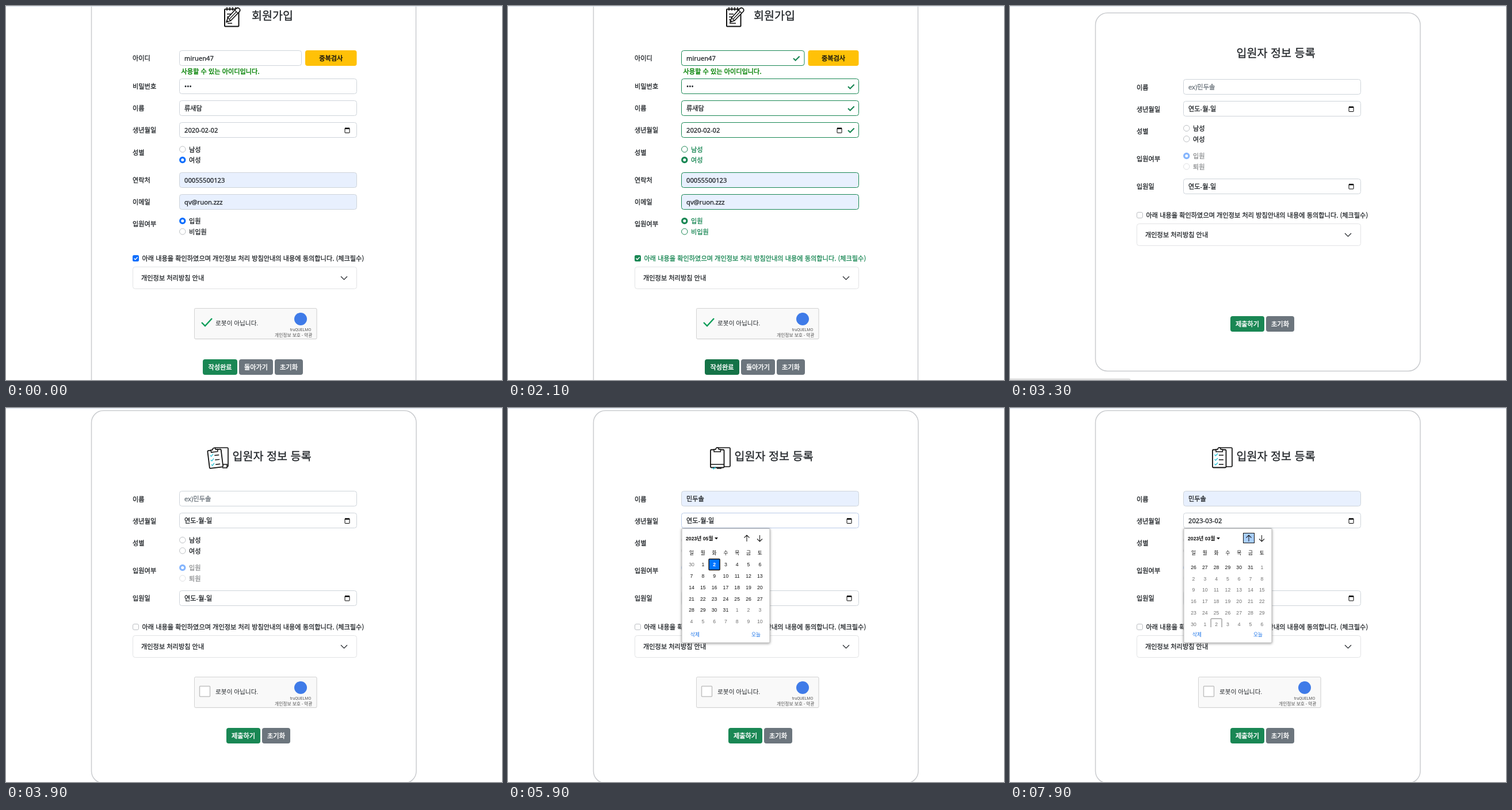
Recreate the animation shown at these times as an HTML page. Size 862x650 px, loop 8 s.

```html
<!DOCTYPE html>
<html lang="ko">
<head>
<meta charset="utf-8">
<title>회원가입</title>
<style>
html, body { margin: 0; height: 100%; overflow: hidden; background: #fff; }
svg { display: block; width: 100vw; height: 100vh; }
text { font-family: "Noto Sans CJK KR", "Noto Sans CJK", sans-serif; }
text.value { font-family: "Noto Sans", "Noto Sans CJK KR", sans-serif; }
text.cal { font-family: "Liberation Sans", "Noto Sans CJK KR", sans-serif; }
text.bot { font-family: Roboto, "Noto Sans CJK KR", sans-serif; }
</style>
</head>
<body>
<svg id="stage" viewBox="0 0 862 650">
<defs>
  <filter id="shadow" x="-10%" y="-10%" width="120%" height="125%">
    <feDropShadow dx="0" dy="1" stdDeviation="2" flood-opacity=".4"/>
  </filter>
  <filter id="soft" x="-10%" y="-10%" width="120%" height="125%">
    <feDropShadow dx="0" dy="1" stdDeviation="1" flood-opacity=".15"/>
  </filter>
  <clipPath id="days"><rect x="303" y="261" width="151" height="120"/></clipPath>
  <clipPath id="board"><rect x="351" y="76" width="25" height="31"/></clipPath>
</defs>
<g id="scene"></g>
</svg>
<script>
const LOOP = 8000;
const INK = '#212529', BLUE = '#0d6efd', GREEN = '#198754', GRAY = '#6c757d', LINE = '#ced4da', FILLED = '#e8f0fe';
const NAME = '민두솔', EMPTY_DATE = '연도-월-일';

const ramp = (t, a, b) => Math.min(1, Math.max(0, (t - a) / (b - a)));
const ease = k => k < .5 ? 2 * k * k : 1 - 2 * (1 - k) ** 2;
const mix = (a, b, k) => `rgb(${a.map((v, i) => v + (b[i] - v) * k)})`;

const rect = (x, y, w, h, fill, stroke = 'none', rx = 0, more = '') =>
  `<rect x="${x}" y="${y}" width="${w}" height="${h}" rx="${rx}" fill="${fill}" stroke="${stroke}" ${more}/>`;
const path = (d, stroke, w = 1, fill = 'none', more = '') =>
  `<path d="${d}" stroke="${stroke}" stroke-width="${w}" fill="${fill}" ${more}/>`;
const circle = (x, y, r, fill, stroke = 'none') =>
  `<circle cx="${x}" cy="${y}" r="${r}" fill="${fill}" stroke="${stroke}"/>`;
const group = (body, attrs) => `<g ${attrs}>${body}</g>`;

// Text centred vertically on y; heavy adds a thin outline for a medium weight.
function text(x, y, s, { size = 11.2, fill = INK, heavy = .28, anchor = 'start', cls = '', weight = 400 } = {}) {
  return `<text x="${x}" y="${y + size * .37}" class="${cls}" font-size="${size}" font-weight="${weight}" fill="${fill}" ` +
    `stroke="${fill}" stroke-width="${heavy}" text-anchor="${anchor}">${s}</text>`;
}

const field = (y, value, { stroke = LINE, fill = '#fff', color = INK, w = 308 } = {}) =>
  rect(301.5, y + .5, w, 26, fill, stroke, 4) + text(310, y + 14, value, { fill: color, cls: 'value' });

const button = (x, y, w, label, fill, color = '#fff') =>
  rect(x, y, w, 27, fill, 'none', 4) +
  text(x + w / 2, y + 14, label, { fill: color, anchor: 'middle', heavy: .45 });

const tick = (x, y) => path(`M${x - 5} ${y}l3.6 3.6l7 -7.2`, GREEN, 2.1);

const dateIcon = (x, y) =>
  rect(x - 4, y - 3.5, 8, 8, 'none', '#000', .5) + rect(x - 4, y - 4.5, 8, 2.5, '#000');

function radio(y, label, on, { accent = BLUE, ring = '#bcbfc3', color = INK } = {}) {
  const dot = on ? circle(306.8, y, 5.7, accent) + circle(306.8, y, 2.5, '#fff') : circle(306.8, y, 5.2, '#fff', ring);
  return dot + text(318, y + .5, label, { fill: color });
}

function consent(y, on, accent, color) {
  const box = on
    ? rect(220, y, 11, 11, accent, 'none', 2.5) + path(`M222.5 ${y + 5.6}l2.2 2.2l4 -4.2`, '#fff', 1.4)
    : rect(220.5, y + .5, 10, 10, '#fff', '#bcbfc3', 2.5);
  return box +
    text(236.5, y + 6, '아래 내용을 확인하였으며 개인정보 처리 방침안내의 내용에 동의합니다. (체크필수)', { fill: color }) +
    rect(220.5, y + 20.5, 389, 38, '#fff', '#e2e3e5', 4) +
    text(235, y + 39.5, '개인정보 처리방침 안내') +
    path(`M582 ${y + 37}l5.5 5.5l5.5 -5.5`, INK, 1.2);
}

function robotCheck(y, done) {
  const mark = done
    ? path(`M340 ${y + 25}l6 6l12 -13`, '#0a9d58', 2.4)
    : rect(336.5, y + 16.5, 18, 18, '#fff', '#c1c1c1', 1, 'stroke-width="1.5"');
  return rect(327.5, y + .5, 213, 54, '#000', 'none', 2, 'opacity=".08"') +
    rect(327.5, y + .5, 212.5, 53, '#f9f9f9', '#d3d3d3', 2) + mark +
    text(364, y + 26.5, '로봇이 아닙니다.', { size: 10.7, cls: 'bot', heavy: 0 }) +
    circle(512, y + 19, 11, '#3f7be8') +
    text(512, y + 37.5, 'truQUELMO', { size: 7, cls: 'bot', heavy: 0, fill: '#555', anchor: 'middle' }) +
    text(467, y + 47.5, '개인정보 보호 - 약관', { size: 7.8, cls: 'bot', heavy: 0, fill: '#555' });
}

function notepad(t) {
  const clock = t < 1200 ? Math.min(t, 400) : Math.min(t, 2700) - 800;
  const dx = 4 - 4 * Math.cos(clock / 1075 * 2 * Math.PI);
  return rect(380, 5.5, 24.5, 30, '#fff', '#111', 1, 'stroke-width="2"') +
    path('M384 2v6M389 2v6M394 2v6M399 2v6', '#111', 1.6) +
    path('M384 14h8M384 19h7M384 24h6', '#111', 1.5) +
    path(`M385 30h${8 + dx}`, '#111', 1.5) +
    group(
      path('M383 28L385.5 20.5L400 4.5Q403 2 405.5 4.5Q408 7 405.5 10L390.5 25.5Z', '#111', 1.7, '#fff', 'stroke-linejoin="round"') +
      path('M397.5 7l5.5 5.5M385.5 20.5l5 5M388.5 22.5l12 -12.5', '#111', 1.1) +
      path('M383 28l1 -3l2 2Z', '#111', 1, '#111'),
      `transform="translate(${dx} 0)"`);
}

function clipboard(t) {
  const tilt = 1 - ramp(t, 4200, 4450);
  const rise = t < 5900 ? 0 : 23 - 23 * ramp(t, 6500, 7400);
  const checks = t < 4450 || t > 5200;
  let rows = '';
  for (let i = 0; i < 3; i++) {
    const y = 82 + 8 * i + rise;
    if (checks) {
      rows += path(`M355.5 ${y - 1}l2 2l3.5 -4`, '#2bc4d8', 1.3) + path(`M363 ${y}h8`, '#111', 1.5);
    } else {
      const half = 7 * ramp(t, 4500 + 150 * i, 5100 + 150 * i);
      rows += path(`M${364 - half} ${y + 2}h${2 * half}`, '#111', 1.5);
    }
  }
  if (rise > 0) rows += path(`M351 ${75 + rise}h25`, '#111', 1.5);
  const curl = tilt > 0 ? path('M376 98h8v6h-8', '#111', 1.5, '#fff', `opacity="${tilt}"`) : '';
  return rect(362, 69, 24, 33, '#fff', '#111', 1.5, 'stroke-width="1.7"') + curl +
    group(
      rect(352, 72.5, 23.5, 31, '#fff', '#111', 1.5, 'stroke-width="1.8"') +
      group(rows, 'clip-path="url(#board)"') +
      path('M358 76v-4h3q0 -3 2.7 -3q2.7 0 2.7 3h3v4Z', '#111', 1.5, '#fff'),
      `transform="rotate(${-7 * tilt} 366 88)"`);
}

function signUp(t) {
  const valid = t >= 1200, k = ramp(t, 1150, 1300);
  const stroke = mix([206, 212, 218], [25, 135, 84], k);
  const style = valid ? { accent: GREEN, ring: GREEN, color: GREEN } : {};
  const hover = mix([25, 135, 84], [21, 115, 71], ramp(t, 650, 800));
  const shift = valid ? 1.5 : 0;
  const labels = [['아이디', 91], ['비밀번호', 140], ['이름', 178], ['생년월일', 216], ['성별', 254.5],
    ['연락처', 302.5], ['이메일', 341], ['입원여부', 379]];
  return path('M148.5 0V650M712.5 0V650', '#cacccf', 1.5) +
    notepad(t) + text(427, 17, '회원가입', { size: 19.6 }) +
    labels.map(([s, y]) => text(220, y, s)).join('') +
    field(77, 'miruen47', { stroke, w: 212 + shift }) +
    button(520 + shift, 77, 89.5 - shift, '중복검사', '#ffc107', '#111') +
    text(304.5, 113.5, '사용할 수 있는 아이디입니다.', { fill: '#008000', heavy: .4 }) +
    field(126, '•••', { stroke }) + field(164, '류새담', { stroke }) +
    field(202, '2020-02-02', { stroke }) + dateIcon(valid ? 576 : 593, 216) +
    (valid ? tick(501, 91) + tick(596, 140) + tick(596, 178) + tick(596, 216) : '') +
    radio(249, '남성', false, style) + radio(267.5, '여성', true, style) +
    field(289, '00055500123', { stroke, fill: FILLED }) +
    field(327, 'qv@ruon.zzz', { stroke, fill: FILLED }) +
    radio(373.5, '입원', true, style) + radio(392, '비입원', false, style) +
    consent(433, true, valid ? GREEN : BLUE, valid ? GREEN : INK) +
    robotCheck(525, true) +
    button(342, 614, 60, '작성완료', hover) +
    button(405, 614, 59, '돌아가기', GRAY) + button(467, 614, 49, '초기화', GRAY);
}

function suggestions(t) {
  const names = ['류새담', NAME, '사로니', '123123', '하늘달리오'];
  const body = rect(371, 182, 75.5, 127.5, '#fff', 'none', 2, 'filter="url(#soft)"') +
    (t >= 4600 ? rect(371, 207, 75.5, 24, '#ececec') : '') +
    names.map((s, i) => text(380, 194.5 + 25 * i, s, { size: 9.6, heavy: 0, fill: '#777' })).join('');
  return group(body, `opacity="${1 - ramp(t, 4980, 5200)}"`);
}

const monthAt = t => t < 7600 ? 5 : t < 7850 ? 4 : 3;

function calendar(t) {
  const month = monthAt(t), pitch = 19.8;
  const scroll = 5 * ease(ramp(t, 7580, 7830)) + 4 * ease(ramp(t, 7850, 8150));
  const col = i => 319 + pitch * i;
  const small = { size: 8.7, cls: 'cal', heavy: 0, anchor: 'middle' };
  let days = '';
  for (let r = -10; r < 7; r++) {
    const y = 272 + pitch * (r + scroll);
    if (y < 250 || y > 392) continue;
    for (let c = 0; c < 7; c++) {
      const date = new Date(2023, 3, 30 + 7 * r + c), m = date.getMonth() + 1, d = date.getDate();
      const picked = d === 2 && m === month, today = d === 2 && m === 5;
      if (picked) days += rect(col(c) - 9.5, y - 9.5, 19, 19, '#0075ff', '#101010', 1, 'stroke-width="1.4"');
      else if (today) days += rect(col(c) - 9.5, y - 9.5, 19, 19, 'none', '#767676', 1);
      days += text(col(c), y, d, { ...small, weight: picked ? 700 : 400, fill: picked ? '#fff' : m === month ? '#101010' : '#707070' });
    }
  }
  const hover = t >= 7550
    ? rect(405.5, 217.5, 19, 17, '#a9cfff', '#101010')
    : t >= 7200 ? rect(405, 217, 20, 18, '#e3effd') : '';
  return rect(302, 209.5, 153, 198.5, '#fff', '#b5b5b5', 1, 'filter="url(#shadow)"') +
    text(309, 226.5, `2023년 0${month}월`, { ...small, anchor: 'start', weight: 700, fill: '#101010' }) +
    path('M359 225h6l-3 3.5Z', 'none', 0, '#101010') + hover +
    path('M415 232v-11M410.5 225.5l4.5 -4.5l4.5 4.5M437.5 221v11M433 227.5l4.5 4.5l4.5 -4.5', '#222', 1.1) +
    [...'일월화수목금토'].map((s, i) => text(col(i), 251.5, s, { ...small, fill: '#101010' })).join('') +
    group(days, 'clip-path="url(#days)"') +
    text(317, 394, '삭제', { ...small, anchor: 'start', fill: '#1a73e8' }) +
    text(423, 394, '오늘', { ...small, anchor: 'start', fill: '#1a73e8' });
}

function patientForm(t) {
  const loaded = t >= 3400, dy = loaded ? 0 : -17;
  const focus = ramp(t, 4050, 4200) - ramp(t, 5750, 5900);
  const filled = t >= 4700, open = t >= 5900;
  const nameStroke = mix([206, 212, 218], [134, 183, 254], focus);
  const labels = [['이름', 158.5], ['생년월일', 196.5], ['성별', 235], ['입원여부', 282.5], ['입원일', 331]];
  const birth = t < 7600 ? EMPTY_DATE : `2023-0${monthAt(t)}-02`;
  const caretOn = t >= 4100 && t < 5800 && (t - 3900) % 1000 < 500;
  const caretX = filled ? 342.5 : 310;
  const form = labels.map(([s, y]) => text(220, y, s)).join('') +
    (focus > 0 ? rect(300, 143, 311, 29, 'none', BLUE, 5.5, `stroke-width="3" opacity="${.25 * focus}"`) : '') +
    field(144, filled ? NAME : 'ex)' + NAME, { stroke: nameStroke, fill: filled ? FILLED : '#fff', color: filled ? INK : GRAY }) +
    (caretOn ? path(`M${caretX} 151v14`, '#111') : '') +
    field(182, birth, { stroke: open && t < 7550 ? '#b9cbe8' : LINE }) + dateIcon(593, 196) +
    radio(229.5, '남성', false) + radio(248, '여성', false) +
    group(radio(277.5, '입원', true) + radio(296, '퇴원', false), 'opacity=".5"') +
    field(317, EMPTY_DATE) + dateIcon(593, 330.5) +
    consent(375, false, BLUE, INK) +
    (t >= 3500 ? robotCheck(467, false) : '') +
    button(383, 556, 59, '제출하기', GREEN) + button(445, 556, 49, '초기화', GRAY);
  return rect(148.5, loaded ? 4.5 : 12, 564.5, loaded ? 647.5 : 622.5, '#fff', '#cacccf', 21, 'stroke-width="1.5"') +
    (loaded ? clipboard(t) : rect(-4, 648, 213, 6, '#e4e4e4', '#d4d4d4', 2)) +
    text(393.5, loaded ? 84 : 81.5, '입원자 정보 등록', { size: 19.6 }) +
    group(form, `transform="translate(0 ${dy})"`) +
    (t >= 4300 && t < 5200 ? suggestions(t) : '') +
    (open ? calendar(t) : '');
}

const scene = document.getElementById('scene');
const start = performance.now();
function draw() {
  const t = (performance.now() - start) % LOOP;
  scene.innerHTML = (t < 3200 ? signUp(t) : patientForm(t)) + rect(0, 0, 862, 1, '#d5dfec');
  requestAnimationFrame(draw);
}
draw();
</script>
</body>
</html>
```
